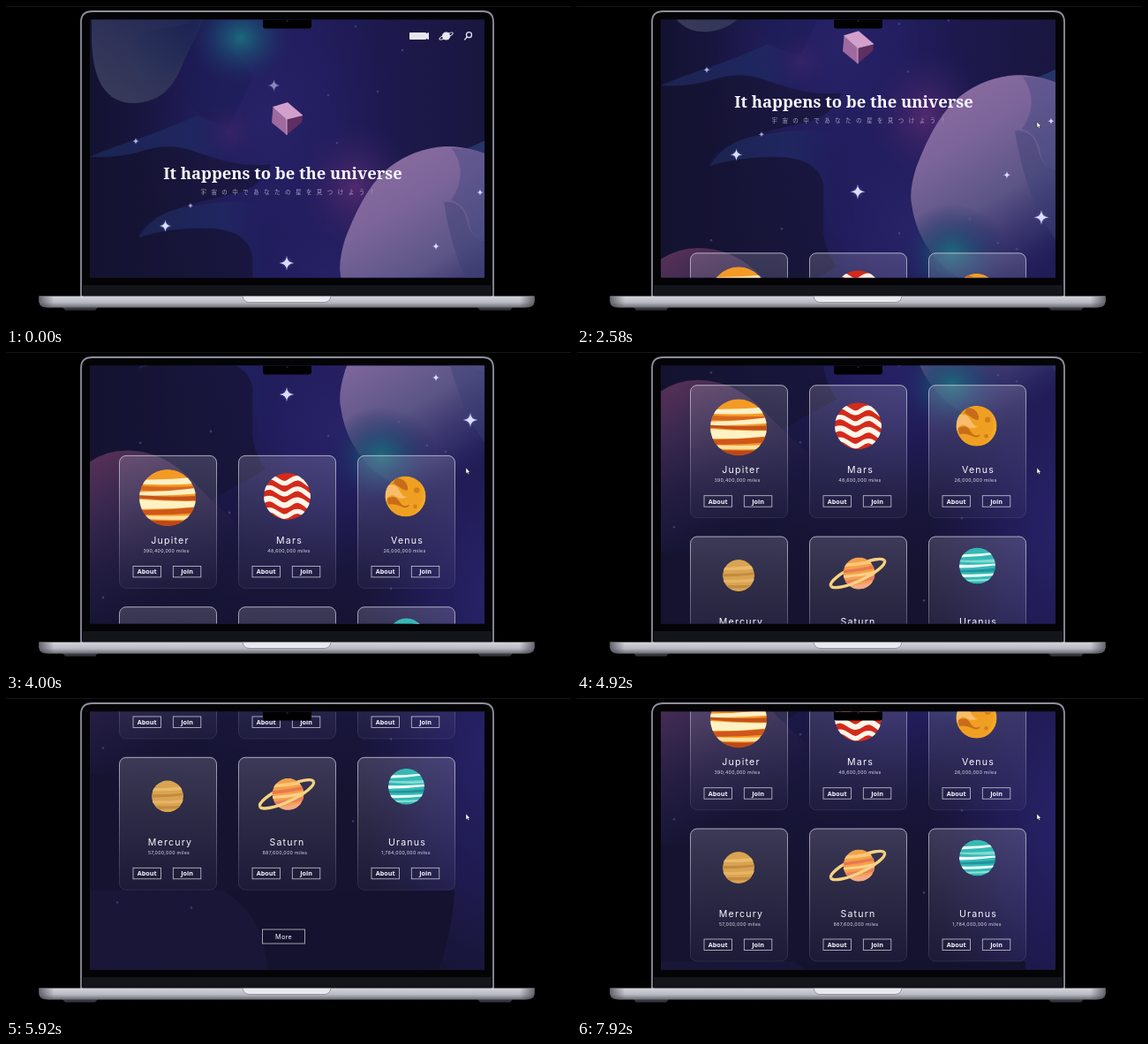
Write an HTML page that moves like this. It is 640 px wide and 360 px high and loops after 8000 ms.

```html
<!DOCTYPE html>
<html lang="en">
<head>
<meta charset="utf-8">
<title>Universe</title>
<style>
html, body { margin: 0; width: 100%; height: 100%; overflow: hidden; background: #000; }
svg { display: block; width: 100vw; height: 100vh; }
text { text-anchor: middle; fill: #f8f8ff; }
.title { font: 600 18.4px "Noto Serif", serif; }
.sub { font: 400 6.5px "Noto Sans CJK JP", "Noto Sans CJK", sans-serif; letter-spacing: 5.45px; fill: #a5a3c2; }
.name { font: 400 10.6px Inter, sans-serif; letter-spacing: 1.2px; }
.dist { font: 400 5.3px Inter, sans-serif; letter-spacing: .28px; fill: #dadae8; }
.btn { font: 700 7.2px "Noto Sans", sans-serif; }
.more { font: 400 7.2px Inter, sans-serif; letter-spacing: .3px; }
</style>
</head>
<body>
<svg viewBox="0 0 640 360" preserveAspectRatio="none">
<defs>
  <clipPath id="screen"><rect x="95" y="15.5" width="447" height="292"/></clipPath>
  <clipPath id="unit"><circle r="1"/></clipPath>
  <linearGradient id="night">
    <stop offset="0" stop-color="#141232"/><stop offset=".35" stop-color="#1d1a50"/>
    <stop offset=".55" stop-color="#201b59"/><stop offset="1" stop-color="#19163f"/>
  </linearGradient>
  <linearGradient id="dusk" x1="0" y1="0" x2="0" y2="1">
    <stop offset="0" stop-color="#15132f" stop-opacity="0"/><stop offset="1" stop-color="#15132f"/>
  </linearGradient>
  <radialGradient id="blue">
    <stop offset="0" stop-color="#282268"/><stop offset=".5" stop-color="#252064" stop-opacity=".6"/>
    <stop offset="1" stop-color="#211c58" stop-opacity="0"/>
  </radialGradient>
  <linearGradient id="blob" x1="0" y1="1" x2="1" y2="0">
    <stop offset="0" stop-color="#3c3c5a"/><stop offset=".5" stop-color="#2e3258"/><stop offset="1" stop-color="#1f2556"/>
  </linearGradient>
  <linearGradient id="blob2" x1="0" y1="1" x2="1" y2="0">
    <stop offset="0" stop-color="#343a5c"/><stop offset=".5" stop-color="#252c56"/><stop offset="1" stop-color="#1c2052"/>
  </linearGradient>
  <linearGradient id="swoosh">
    <stop offset="0" stop-color="#1b2450"/><stop offset=".6" stop-color="#202660"/><stop offset="1" stop-color="#231e64" stop-opacity="0"/>
  </linearGradient>
  <linearGradient id="mauve" x1="0" y1="0" x2=".5" y2="1">
    <stop offset="0" stop-color="#5a3158"/><stop offset=".3" stop-color="#39284f"/>
    <stop offset=".75" stop-color="#1d1a40" stop-opacity=".6"/><stop offset="1" stop-color="#15132f" stop-opacity="0"/>
  </linearGradient>
  <linearGradient id="orbFill" x1=".2" y1="0" x2=".6" y2="1">
    <stop offset="0" stop-color="#8d6da0"/><stop offset=".3" stop-color="#7c659a"/>
    <stop offset=".6" stop-color="#5b5586"/><stop offset=".85" stop-color="#332f6a" stop-opacity=".8"/>
    <stop offset="1" stop-color="#252062" stop-opacity="0"/>
  </linearGradient>
  <linearGradient id="card" x1="0" y1="0" x2="0" y2="1">
    <stop offset="0" stop-color="#c4c0d4" stop-opacity=".22"/><stop offset="1" stop-color="#a8a4c0" stop-opacity=".05"/>
  </linearGradient>
  <linearGradient id="edge" x1="0" y1="0" x2="0" y2="1">
    <stop offset="0" stop-color="#cccbdc" stop-opacity=".8"/><stop offset="1" stop-color="#b0aec8" stop-opacity=".12"/>
  </linearGradient>
  <linearGradient id="metal" x1="0" y1="0" x2="0" y2="1">
    <stop offset="0" stop-color="#d6d6de"/><stop offset=".55" stop-color="#b9b9c3"/><stop offset="1" stop-color="#696972"/>
  </linearGradient>
  <linearGradient id="shade">
    <stop offset="0" stop-color="#3c3c46" stop-opacity=".7"/><stop offset=".03" stop-color="#3c3c46" stop-opacity="0"/>
    <stop offset=".97" stop-color="#3c3c46" stop-opacity="0"/><stop offset="1" stop-color="#3c3c46" stop-opacity=".7"/>
  </linearGradient>
  <radialGradient id="teal">
    <stop offset="0" stop-color="#1b6a7c"/><stop offset=".45" stop-color="#1c4670" stop-opacity=".65"/>
    <stop offset="1" stop-color="#1f245e" stop-opacity="0"/>
  </radialGradient>
  <radialGradient id="violet">
    <stop offset="0" stop-color="#52296e"/><stop offset=".5" stop-color="#3c2468" stop-opacity=".55"/>
    <stop offset="1" stop-color="#2b2060" stop-opacity="0"/>
  </radialGradient>
  <radialGradient id="glow">
    <stop offset="0" stop-color="#d8dcff" stop-opacity=".75"/><stop offset=".35" stop-color="#6f74d8" stop-opacity=".4"/>
    <stop offset="1" stop-color="#4a4cb8" stop-opacity="0"/>
  </radialGradient>
</defs>

<rect width="640" height="360"/>
<rect width="640" height="1" fill="#151515"/>
<path d="M85 329V18Q85 6 98 6H540Q552 6 552 18V329Z" fill="#040406" stroke="#8f8f9e" stroke-width="1.8"/>
<rect x="87" y="316" width="463" height="13" fill="#14141b"/>

<g clip-path="url(#screen)">
  <rect x="95" y="15" width="447" height="293" fill="#15132f"/>
  <g id="page">
    <g id="sky">
      <rect x="95" y="-10" width="447" height="820" fill="url(#night)"/>
      <rect x="95" y="330" width="447" height="250" fill="url(#dusk)"/>
      <rect x="95" y="580" width="447" height="230" fill="#15132f"/>
      <ellipse cx="295" cy="130" rx="150" ry="210" fill="url(#blue)"/>
      <ellipse cx="375" cy="330" rx="130" ry="160" fill="url(#blue)"/>
      <ellipse cx="545" cy="520" rx="150" ry="320" fill="url(#blue)"/>
      <path d="M94 171Q125 158 148 151Q180 140 216 124Q262 140 290 170Q250 178 212 164Q180 156 155 164T94 171Z" fill="url(#swoosh)"/>
      <path d="M94 172Q125 174 155 164T212 164Q262 184 300 179Q290 204 262 212Q208 222 168 240Q148 253 150 262Q190 249 238 252Q274 256 279 282V338Q282 360 294 376L180 440H94Z" fill="#15132f" opacity=".6"/>
      <path d="M150 262Q168 232 208 227Q250 218 310 224V350Q279 345 280 285Q274 256 238 252Q190 249 150 262Z" fill="url(#swoosh)"/>
      <path d="M97 30Q96 110 145 110C190 108 196 72 207 51Q218 27 226 10H97Z" fill="url(#blob)"/>
      <path d="M139 66Q137 29 174 26Q202 24 222 10Q215 33 207 51C198 72 184 84 166 84Q145 85 139 66Z" fill="url(#blob2)"/>
      <path d="M207 51Q192 80 202 102Q220 131 253 136L280 80L232 18Z" fill="#1b1b54" opacity=".45"/>
      <ellipse cx="266" cy="36" rx="62" ry="55" fill="url(#teal)"/>
      <ellipse cx="254" cy="143" rx="36" ry="36" fill="url(#violet)" opacity=".4"/>
      <ellipse cx="395" cy="205" rx="66" ry="75" fill="url(#violet)"/>
      <path d="M505 168Q522 162 545 151V260H505Z" fill="#26346a"/>
      <path d="M545 168Q520 158 497 159Q463 161 435 182T384 264Q376 290 379 305Q385 350 420 380Q480 425 545 410Z" fill="url(#orbFill)"/>
      <path d="M505 161Q524 160 545 168V270Q528 266 525 246Q521 225 504 220Q525 190 505 161Z" fill="#37437c" opacity=".4"/>
      <path d="M496 222Q517 220 522 243T545 268V350Q508 300 496 222Z" fill="#3a3f74" opacity=".45"/>
      <ellipse cx="425" cy="361" rx="62" ry="56" fill="url(#teal)"/>
      <path d="M94 368Q123 348 162 358Q190 365 218 396Q239 417 260 436L270 550H94Z" fill="url(#mauve)"/>
      <path d="M95 682H245Q292 708 297 772V790H95Z" fill="#191637"/>
      <path d="M297 790Q297 708 245 682H508Q506 733 484 790Z" fill="#14122e"/>
    </g>
    <g id="icons" fill="#e6e6ee">
      <g id="menu"><rect x="457" y="30" width="19" height="8" rx=".8"/><path d="M476 31l3 -1v8l-3 -1Z"/></g>
      <circle cx="498.6" cy="34" r="4.6"/>
      <ellipse cx="498.6" cy="34" rx="8.4" ry="2" fill="none" stroke="#e6e6ee" transform="rotate(-25 498.6 34)"/>
      <g fill="none" stroke="#e6e6ee" stroke-width="1.3"><circle cx="524.5" cy="32.7" r="3"/><path d="M522.3 35l-3 3.4"/></g>
    </g>
    <g id="cube">
      <path d="M302.5 114L319 109L336 123.5L318 128Z" fill="#d3a0cc"/>
      <path d="M302.5 114L318 128V146L301 132Z" fill="#9f6a9f"/>
      <path d="M336 123.5L318 128V146L335 131.5Z" fill="#5f2f62"/>
      <path d="M302.5 114L318 128L336 123.5M318 128V146" fill="none" stroke="#e6c0e0" stroke-width=".8"/>
    </g>
    <text class="title" x="313.5" y="195.7">It happens to be the universe</text>
    <text class="sub" x="322" y="213">宇宙の中であなたの星を見つけよう！</text>
    <g id="cards"></g>
    <rect x="290.5" y="726.5" width="48" height="16" fill="none" stroke="#c2c2d0" stroke-width=".8"/>
    <text class="more" x="314.5" y="737">More</text>
  </g>
  <path d="M291 15H346V22.5Q346 25.5 343 25.5H294Q291 25.5 291 22.5Z"/>
  <circle cx="318.5" cy="17" r="1.3" fill="#191922"/>
</g>
<path id="cursor" d="M0 0V6.6L1.5 5.4L2.6 7.6L3.7 7L2.7 5H4.5Z" fill="#fff" stroke="#111" stroke-width=".4"/>

<path d="M64 341H104L101 344.5H67ZM534 341H574L571 344.5H537Z" fill="#35353d"/>
<path d="M37.5 328.5H598.5V335Q598 341.5 588 341.5H48Q38 341.5 37.5 335Z" fill="url(#metal)"/>
<path d="M37.5 328.5H598.5V335Q598 341.5 588 341.5H48Q38 341.5 37.5 335Z" fill="url(#shade)"/>
<path d="M268 328.5H368Q367 335.5 360 335.5H276Q269 335.5 268 328.5Z" fill="#e9e9ef" stroke="#85858f" stroke-width=".8"/>
</svg>
<script>
const $ = id => document.getElementById(id);
const add = (id, html) => $(id).insertAdjacentHTML("beforeend", html);

// Sky: four-pointed stars and faint dots
const star = ([x, y, r, o = 1]) => `<g transform="translate(${x} ${y}) scale(${r})" opacity="${o}">
  <circle r=".85" fill="url(#glow)"/>
  <path d="M0 -1Q.03 -.03 1 0Q.03 .03 0 1Q-.03 .03 -1 0Q-.03 -.03 0 -1Z" fill="#dcdcff"/></g>`;
add("sky", [[303.5, 90, 7, .55], [147, 153, 4, .8], [209, 226, 3.5, .7], [180.5, 249, 7],
  [318, 291, 8.5], [487, 272, 4.5], [537, 211, 4], [526, 320, 8.5]].map(star).join(""));
const dots = [[365, 101], [421, 97], [396, 23], [449, 50], [375, 155], [445, 322], [477, 349], [498, 356],
  [383, 313], [365, 338], [232, 333], [152, 346], [253, 425], [436, 511], [393, 604], [110, 521], [210, 702], [126, 696]];
add("sky", dots.map(([x, y]) => `<circle cx="${x}" cy="${y}" r="1.3" fill="#5a58a8" opacity=".55"/>`).join(""));

// Planets are drawn in a unit circle
const band = (y1, y2, h1, h2, c) =>
  `<path d="M-1 ${y1}Q0 ${(y1 + y2) / 2 + .06} 1 ${y2}V${y2 + h2}Q0 ${(y1 + y2 + h1 + h2) / 2 + .06} -1 ${y1 + h1}Z" fill="${c}"/>`;
const wave = (y, w, c) =>
  `<path d="M-1.1 ${y}C-.5 ${y - .42} -.35 ${y + .42} .1 ${y + .08}S.7 ${y + .1} 1.1 ${y + .32}" fill="none" stroke="${c}" stroke-width="${w}"/>`;
const ball = (x, y, r, base, art) => `<g transform="translate(${x} ${y}) scale(${r})">
  <g clip-path="url(#unit)"><circle r="1" fill="${base}"/>${art}</g></g>`;

const art = {
  Jupiter: ball(55, 48, 32, "#f39a25",
    band(-.64, -.72, .16, .22, "#fff0c6") + band(-.42, -.4, .16, .12, "#d8671d") +
    band(-.2, -.34, .12, .2, "#fff0c6") + band(-.08, -.06, .1, .16, "#c4501a") +
    band(.06, .12, .34, .2, "#fff2c4") + band(.44, .34, .16, .2, "#cf561b") +
    band(.62, .62, .12, .14, "#fbe0a2") + band(.78, .8, .3, .3, "#bd4717")),
  Mars: ball(55.5, 46.5, 26.5, "#d42a1b",
    wave(-.72, .2, "#fff6ea") + wave(-.26, .2, "#fff6ea") + wave(.22, .24, "#fff6ea") + wave(.7, .2, "#fff6ea")),
  Venus: ball(54.5, 46.5, 23, "#efa022",
    `<path d="M-1 -.5Q-.5 -.7 -.3 -.3T.1 0Q-.2 .2 -.5 0T-1 .3Z" fill="#f7bd6c"/>
     <path d="M-.5 -.9Q0 -.9 .1 -.5T-.3 -.45T-.6 -.6ZM-.9 .1Q-.5 -.1 -.3 .25T.2 .4Q.1 .65 -.2 .5T-.85 .4Z" fill="#c96c1a"/>
     <circle cx=".55" cy="-.3" r=".14" fill="#d27e1c"/><circle cx=".48" cy=".5" r=".1" fill="#d27e1c"/>
     <path d="M.4 -1Q1 -.5 .8 .2T.1 1H1V-1Z" fill="#f4b02d" opacity=".6"/>`),
  Mercury: ball(55, 44.5, 18, "#d9a352",
    band(-.5, -.62, .16, .22, "#e8ba6c") + band(-.12, -.2, .2, .14, "#c38a3f") +
    band(.28, .2, .16, .2, "#e6b465") + band(.6, .58, .2, .16, "#c48b40")),
  Saturn: (() => {
    const arc = s => `<path d="M-33.5 0A33.5 8.5 0 0 ${s} 33.5 0" transform="translate(55 42) rotate(-25)" fill="none" stroke="#f6d382" stroke-width="3.4"/>`;
    const body = ball(56.5, 42, 18, "#f3a14a",
      band(-.6, -.86, .2, .22, "#fbc878") + band(-.2, -.5, .2, .2, "#e8784f") +
      band(.14, -.14, .15, .2, "#fcd08a") + band(.48, .16, .22, .22, "#ea7d66") + band(.86, .52, .3, .3, "#f5a987"));
    return arc(1) + body + arc(0);
  })(),
  Uranus: ball(55.5, 33.5, 20.5, "#35b9b6",
    band(-.62, -.74, .16, .1, "#e9fff6") + band(-.32, -.36, .1, .18, "#7fdcd0") + band(-.06, -.12, .18, .1, "#effff8") +
    band(.24, .14, .1, .16, "#1f949e") + band(.46, .42, .17, .12, "#e6fff4") + band(.76, .7, .1, .1, "#8be2d4"))
};

const button = (x, label) => `<rect x="${x}" y="125.5" width="31.5" height="12.5" fill="none" stroke="#c6c6d6" stroke-width=".8"/>
  <text class="btn" x="${x + 15.75}" y="134.4">${label}</text>`;
const planets = [["Jupiter", "390,400,000", 58, 53.5], ["Mars", "48,600,000", 58, 57.5], ["Venus", "26,000,000", 56.5, 53.5],
  ["Mercury", "57,000,000", 58, 56.5], ["Saturn", "887,600,000", 55.5, 53], ["Uranus", "1,784,000,000", 56.5, 55]];
planets.forEach(([name, miles, nx, mx], i) => {
  const x = 128 + i % 3 * 135, y = i < 3 ? 360 : 531.3;
  add("cards", `<g transform="translate(${x} ${y})">
    <rect x=".5" y=".5" width="110" height="150" rx="7.5" fill="url(#card)" stroke="url(#edge)"/>
    ${art[name]}
    <text class="name" x="${nx}" y="100">${name}</text>
    <text class="dist" x="${mx}" y="110">${miles} miles</text>
    ${button(16, "About")}${button(61.3, "Join")}</g>`);
});

// Motion: each turn of the wheel glides the page by one notch
const LOOP = 8000, NOTCH = 80.7, TURN = 320;
const wheel = [[2230, NOTCH], [2850, NOTCH], [3460, NOTCH], [3980, NOTCH], [5200, NOTCH], [5500, 61], [7450, -NOTCH]];
const path = [[1500, 614, 60], [1670, 470, 34], [1820, 527, 133], [1920, 527, 133], [2120, 521, 131]];
const clamp = v => Math.min(1, Math.max(0, v));
const ease = v => v * v * (3 - 2 * v);
const scrollAt = t => wheel.reduce((s, [at, d]) => s + d * ease(clamp((t - at) / TURN)), 0);

function pointer(t) {
  let [, x, y] = path[0];
  for (let i = 1; i < path.length; i++) {
    const [a, x0, y0] = path[i - 1], [b, x1, y1] = path[i];
    if (t < a) break;
    const k = ease(clamp((t - a) / (b - a)));
    x = x0 + (x1 - x0) * k;
    y = y0 + (y1 - y0) * k;
  }
  return [x, y];
}

function draw(t) {
  $("page").setAttribute("transform", `translate(0 ${-scrollAt(t).toFixed(2)})`);
  const [x, y] = pointer(t);
  $("cursor").setAttribute("transform", `translate(${x.toFixed(2)} ${y.toFixed(2)})`);
  $("cursor").setAttribute("visibility", t < path[0][0] ? "hidden" : "visible");
  $("menu").setAttribute("fill", t > 1640 && t < 1900 ? "#96d2e4" : "#e6e6ee");
}

const start = performance.now();
function tick() {
  draw((performance.now() - start) % LOOP);
  requestAnimationFrame(tick);
}
draw(0);
tick();
</script>
</body>
</html>
```
